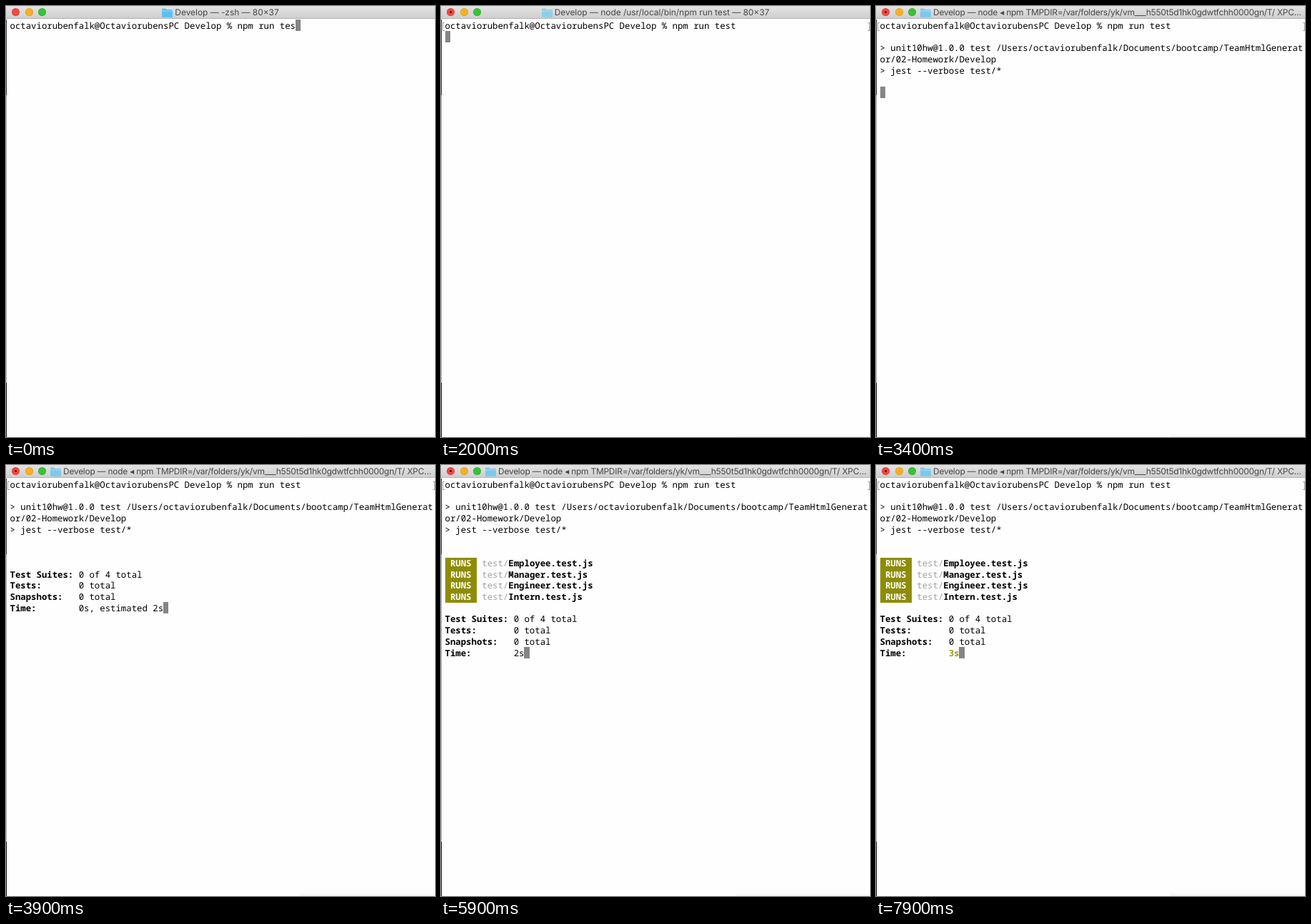
Recreate the animation shown at these times as an HTML page. Size 600x604 px, loop 8000 ms.

```html
<!DOCTYPE html>
<html lang="en">
<head>
<meta charset="utf-8">
<title>Terminal</title>
<style>
html, body { margin: 0; width: 100%; height: 100%; overflow: hidden; }
body { position: relative; background: #fffeff; text-rendering: geometricPrecision; }
body > * { position: absolute; }
#bar {
  left: 0; top: 0; width: 600px; height: 18px; box-sizing: border-box;
  background: linear-gradient(#e4e3e4, #d0cfd0); border-bottom: 1px solid #b4b2b4;
}
#edge {
  left: 0; top: 19px; width: 1px; height: 585px;
  background: linear-gradient(#333 106px, #aaa 106px 509px, #111 509px);
}
#shade { left: 412px; top: 599px; width: 188px; height: 5px; background: linear-gradient(#fffeff, #f4f5f4); }
.light { top: 3px; width: 11px; height: 11px; border-radius: 50%; box-shadow: inset 0 0 0 .7px #0002; }
#busy { left: 12px; top: 7px; width: 3px; height: 3px; border-radius: 50%; background: #4a0505; }
#title {
  left: 62px; top: 0; width: 476px; height: 18px;
  display: flex; align-items: center; justify-content: safe center;
  font: 11.9px/18px Inter, "DejaVu Sans", sans-serif; color: #484648; white-space: pre;
}
#title.tight { letter-spacing: -.2px; }
#title svg { flex: none; margin-right: 3px; }
#screen {
  left: 5.5px; top: 20px; margin: 0;
  font: 500 12.33px/15.7px "Noto Sans Mono", monospace; color: #000;
}
#screen i {
  display: inline-block; width: 7.4px; height: 16px; margin-top: -1px;
  vertical-align: top; background: #878487;
}
#screen u {
  display: inline-block; height: 15.7px; vertical-align: top;
  background: #8e8c06; color: #fff; font-weight: bold; text-decoration: none;
}
#screen s { color: #a3a1a3; text-decoration: none; }
#screen em { color: #9c9a10; font-style: normal; font-weight: bold; }
.mark { top: 23px; width: 2px; height: 10px; border: 1px solid #a0a0a0; }
#open { left: 2px; border-right: 0; }
#close { left: 597px; border-left: 0; }
</style>
</head>
<body>
<div id="bar"></div>
<div id="edge"></div>
<div id="shade"></div>
<div class="light" style="left:8px;background:#f5483f"></div>
<div class="light" style="left:26.5px;background:#fbb022"></div>
<div class="light" style="left:45px;background:#38c235"></div>
<div id="busy"></div>
<div id="title">
  <svg width="15" height="13"><path id="folder" d="M0 1.5Q0 .5 1 .5H5L6.5 2H14Q15 2 15 3V12Q15 13 14 13H1Q0 13 0 12Z"/><path d="M0 4H15" stroke="#fff" stroke-opacity=".35"/></svg><span id="name"></span>
</div>
<div id="open" class="mark"></div>
<div id="close" class="mark"></div>
<pre id="screen"></pre>
<script>
const LOOP = 8000;
// Moments at which the session advances, in ms
const TYPED = 200, ENTER = 1400, SCRIPT = 2400, RETITLE = 2800, SUMMARY = 3700, RUNS = 4300;
const TICKS = [4900, 5900, 6900];

const el = id => document.getElementById(id);
const prompt = "octaviorubenfalk@OctaviorubensPC Develop % npm run tes";
const script = `

> unit10hw@1.0.0 test /Users/octaviorubenfalk/Documents/bootcamp/TeamHtmlGenerat
or/02-Homework/Develop
> jest --verbose test/*

`;
const runs = ["Employee", "Manager", "Engineer", "Intern"]
  .map(name => `<u> RUNS </u> <s>test/</s><b>${name}.test.js</b>\n`).join("");

const row = (label, value) => `\n<b>${label.padEnd(13)}</b>${value}`;

function summary(t) {
  const sec = TICKS.filter(tick => t >= tick).length;
  const time = sec < 2 ? `${sec}s, estimated 2s` : sec < 3 ? `${sec}s` : `<em>${sec}s</em>`;
  return row("Test Suites:", "0 of 4 total") + row("Tests:", "0 total") +
    row("Snapshots:", "0 total") + row("Time:", time);
}

function screenAt(t) {
  let out = prompt;
  if (t >= TYPED) out += "t";
  if (t >= SCRIPT) out += script;
  else if (t >= ENTER) out += "\n";
  if (t >= SUMMARY) out += "\n" + (t >= RUNS ? runs : "") + summary(t);
  return out + "<i></i>";
}

function titleAt(t) {
  if (t < ENTER) return "Develop — -zsh — 80×37";
  if (t < RETITLE) return "Develop — node /usr/local/bin/npm run test — 80×37";
  return "Develop — node ◂ npm TMPDIR=/var/folders/yk/vm___h550t5d1hk0gdwtfchh0000gn/T/ XPC…";
}

let shown = "";
function draw(now) {
  const t = now % LOOP;
  const screen = screenAt(t), title = titleAt(t);
  if (screen + title !== shown) {
    shown = screen + title;
    el("screen").innerHTML = screen;
    el("name").textContent = title;
    el("title").className = t < RETITLE ? "" : "tight"; // a cut-off title is set closer
    el("folder").setAttribute("fill", t < ENTER ? "#5bc0f3" : t < RETITLE ? "#8dcfe8" : "#7cc9ee");
    for (const id of ["busy", "open", "close"]) el(id).hidden = t < ENTER;
  }
  requestAnimationFrame(draw);
}
draw(0);
</script>
</body>
</html>
```
